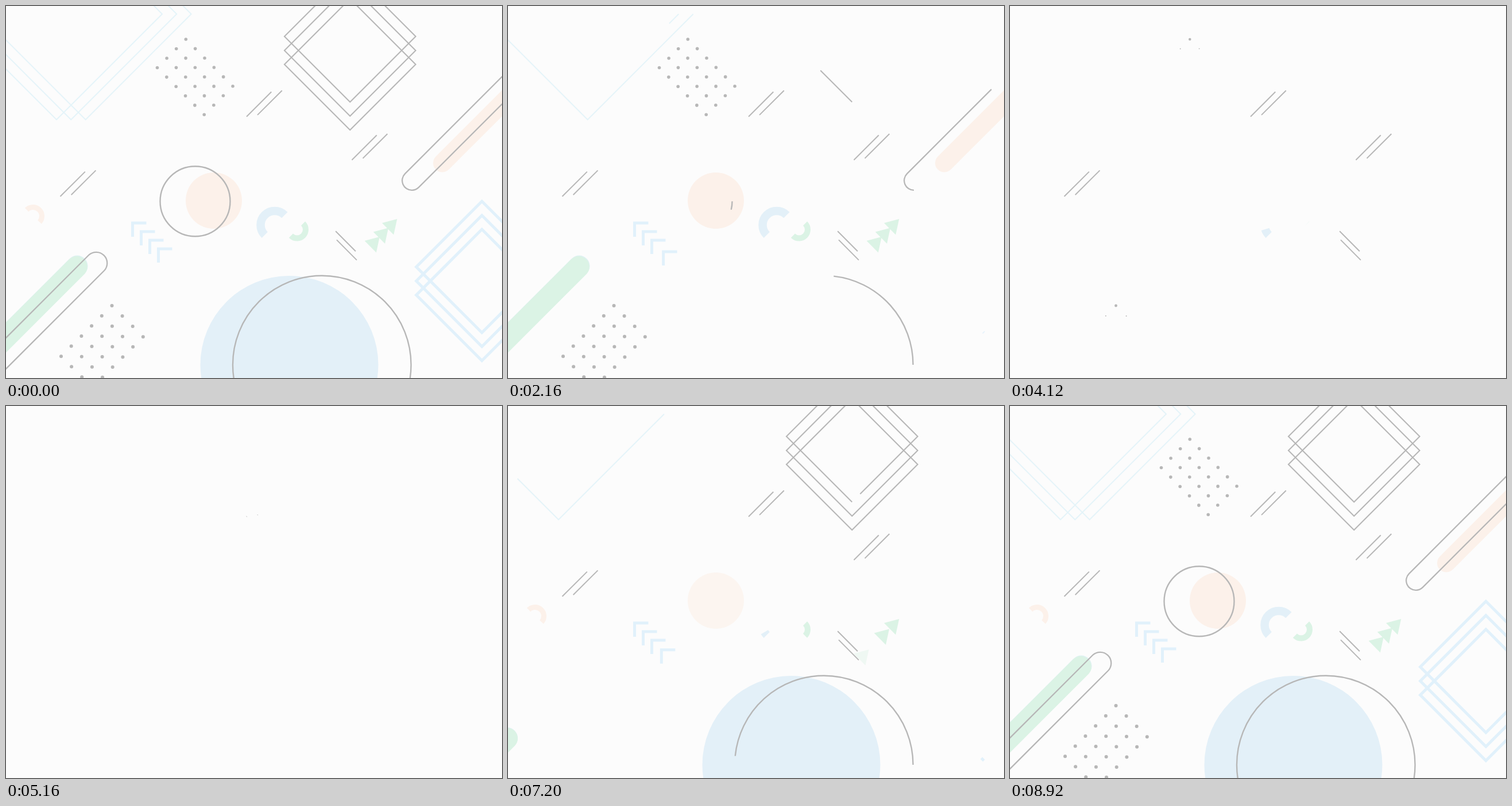
An HTML page for the animation above (10 s loop, 864 px wide and 648 px high).

```html
<!DOCTYPE html>
<html lang="en">
<head>
<meta charset="utf-8">
<title>Geometric pattern</title>
<style>
html, body { margin: 0; height: 100%; overflow: hidden; background: #fcfcfc; }
svg { display: block; width: 100vw; height: 100vh; }
</style>
</head>
<body>
<svg id="stage" viewBox="0 0 864 648" fill="none"></svg>
<script>
const LOOP = 10000, HALF = 5000;
const GREY = '#b7b7b7', SKY = '#e3f0f8', ICE = '#e1f1fb', MIST = '#e5f4f9',
      PEACH = '#fcf1ea', MINT = '#dbf3e5';
const stage = document.getElementById('stage');
const actors = [];

const ease = x => (1 - Math.cos(Math.PI * Math.min(1, Math.max(0, x)))) / 2;

function add(tag, attrs) {
  const node = document.createElementNS('http://www.w3.org/2000/svg', tag);
  for (const key in attrs) node.setAttribute(key, attrs[key]);
  return stage.appendChild(node);
}

// Parts leave during the first half of the loop and return during the second.
function animate(leave, enter, leaveTime, enterTime, show) {
  actors.push(t => show(t < HALF
    ? 1 - ease((t - leave) / leaveTime)
    : ease((t - enter) / enterTime)));
}

function stroke(d, color, width, leave, enter, leaveTime = 900, enterTime = leaveTime) {
  const path = add('path', { d, stroke: color, 'stroke-width': width, pathLength: 1 });
  animate(leave, enter, leaveTime, enterTime, p => {
    path.setAttribute('stroke-dasharray', p > 0.9995 ? 'none' : `${p} 2`);
    path.setAttribute('visibility', p > 0.0003 ? 'visible' : 'hidden');
  });
}

function disc(cx, cy, r, fill, leave, enter) {
  const node = add('circle', { cx, cy, r, fill });
  animate(leave, enter, 500, 500, p => node.setAttribute('opacity', p));
}

// Diagonal rounded bar that slides along its own axis.
function bar(far, tip, width, color, leave, enter) {
  const line = add('line', {
    x1: far[0], y1: far[1], stroke: color, 'stroke-width': width, 'stroke-linecap': 'round'
  });
  animate(leave, enter, 900, 900, p => {
    line.setAttribute('x2', far[0] + (tip[0] - far[0]) * p);
    line.setAttribute('y2', far[1] + (tip[1] - far[1]) * p);
  });
}

// Shape that travels from a shared hiding place while fading.
function traveller(d, fill, dx, dy, leave, enter, leaveTime) {
  const path = add('path', { d, fill });
  animate(leave, enter, leaveTime, 350, p => {
    path.setAttribute('transform', `translate(${dx * (1 - p)} ${dy * (1 - p)})`);
    path.setAttribute('opacity', Math.min(1, 2 * p));
  });
}

function arc(cx, cy, r, from, to, color, width, leave, enter) {
  const point = deg => {
    const a = deg * Math.PI / 180;
    return `${cx + r * Math.cos(a)} ${cy + r * Math.sin(a)}`;
  };
  stroke(`M${point(from)}A${r} ${r} 0 0 1 ${point(to)}`, color, width, leave, enter, 700);
}

function ring(cx, cy, r, sweep, ...timing) {
  stroke(`M${cx + r} ${cy}a${r} ${r} 0 0 ${sweep} ${-2 * r} 0a${r} ${r} 0 0 ${sweep} ${2 * r} 0z`,
    GREY, 2.4, ...timing);
}

const diamondFromBottom = (x, y, h) =>
  `M${x} ${y + h}l${-h} ${-h}l${h} ${-h}l${h} ${h}z`;
const diamondFromRight = (x, y, h) =>
  `M${x + h} ${y}l${-h} ${h}l${-h} ${-h}l${h} ${-h}z`;

function dots(x, y, cols, rows, right, left, r, leave, enter, enterSpan) {
  for (let a = 0; a < cols; a++) for (let b = 0; b < rows; b++) {
    const node = add('circle', {
      cx: x + a * right[0] + b * left[0], cy: y + a * right[1] + b * left[1], fill: GREY
    });
    const order = (a + b) / (cols + rows - 2);
    animate(leave + (1 - order) * 650, enter + order * enterSpan, 250, 250,
      p => node.setAttribute('r', r * p));
  }
}

// Filled shapes
disc(493.5, 625, 155, SKY, 1600, 6250);
disc(362, 339, 49, PEACH, 2140, 6900);
bar([-30, 607], [124, 453], 37, '#def1f2', 2200, 6946);
bar([-30, 607.5], [123.2, 454.3], 37, MINT, 2200, 6946);
bar([960, 73.5], [760, 273.5], 32, PEACH, 2160, 6880);

// Nested diamonds
[[894, 6840], [1347, 7310], [1800, 7632]].forEach(([leave, enter], i) =>
  stroke(diamondFromRight(88 + 25.3 * i, 14, 184), MIST, 2, leave, enter));
[[1464, 6402], [1060, 5950], [660, 5497]].forEach(([leave, enter], i) =>
  stroke(diamondFromBottom(599.3, 53 + 24.4 * i, 114.3), GREY, 2.1, leave, enter));
[[1287, 8014], [774, 7579], [260, 7144]].forEach(([leave, enter], i) =>
  stroke(diamondFromBottom(829, 454.6 + 24.4 * i, 114.3), ICE, 5, leave, enter));

// Outlined circles and capsules
ring(329.5, 340.3, 61, 1, 1374, 7332);
ring(550.3, 625, 155.3, 0, 1658, 6760, 740, 900);
stroke('M707 320.8A16.8 16.8 0 0 1 695.1 292.1L895 92.2A16.8 16.8 0 0 1 918.8 116' +
  'L718.9 315.9A16.8 16.8 0 0 1 707 320.8z', GREY, 2.3, 1635, 7650);
stroke('M-96 674L144 434A19.1 19.1 0 0 1 171 461L-69 701A19.1 19.1 0 0 1 -96 674z',
  GREY, 2.3, 700, 7500, 900, 800);

// Arcs
arc(468, 381.5, 24.5, 135, 315, SKY, 14.5, 3600, 7071);
arc(507, 389.5, 15, -45, 135, MINT, 10, 3450, 6850);
arc(47, 366, 15.5, -135, 42, PEACH, 9, 1300, 6320);

// Chevrons
for (let i = 0; i < 4; i++) {
  const x = 218 + 15 * i, y = 375.5 + 15 * i, shift = 65 - 15 * i;
  traveller(`M${x} ${y}h26.5v5h-21.5v21.5h-5z`, ICE, shift, shift,
    2765 - 252 * i, 6200 + 240 * i, 450);
}

// Triangles
for (let i = 0; i < 3; i++) {
  const x = 655 - 15.2 * i, y = 378 + 15.5 * i, shift = 58 - 15.2 * i;
  traveller(`M${x} ${y}l26.3 -7l-6 27.5z`, MINT, -shift, shift,
    2540 - 180 * i, 6700 + 200 * i, 500);
}

// Dot grids
dots(313.3, 58, 6, 4, [16.35, 16.35], [-16.6, 16.5], 2.8, 3400, 8100, 550);
dots(184.5, 522, 4, 6, [18.1, 18.05], [-17.7, 17.65], 3, 3400, 7690, 300);

// Line pairs
[
  ['M94.5 331.8l43.3 -43.2M113.6 329l42.8 -42.6', 4400, 5430],
  ['M419 192.7l43.3 -43.2M438 189.9l42.8 -42.6', 4480, 5120],
  ['M602.5 268.2l43.3 -43.2M621.6 265.4l42.8 -42.6', 4340, 5230],
  ['M574.2 392.2l34.8 35M576 407.4l35 35.2', 4430, 5330]
].forEach(([pair, leave, enter]) => pair.split('M').slice(1).forEach(d =>
  stroke('M' + d, GREY, 2, leave, enter, 450, 600)));

const begin = performance.now();
function frame() {
  const t = (performance.now() - begin) % LOOP;
  actors.forEach(act => act(t));
  requestAnimationFrame(frame);
}
frame();
</script>
</body>
</html>
```
